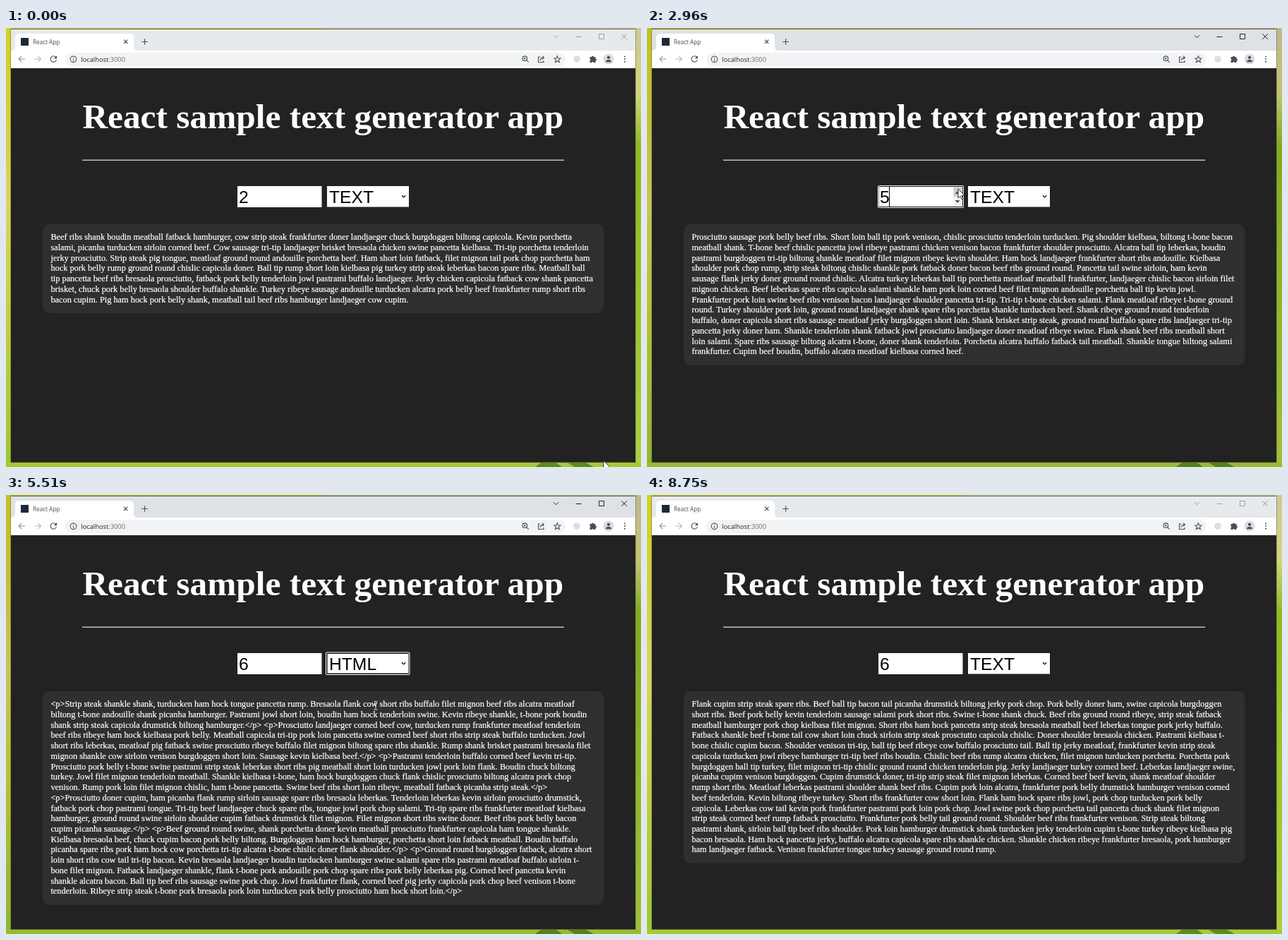
Recreate the animation shown at these times as an HTML page. Size 900x622 px, loop 8.83 s.

```html
<!DOCTYPE html>
<html lang="en">
<head>
<meta charset="utf-8">
<title>React sample text generator app</title>
<style>
html, body { margin: 0; width: 100%; height: 100%; overflow: hidden; }
svg { display: block; width: 900px; height: 622px; }
.ui { font-family: "Open Sans", "Noto Sans", sans-serif; }
.serif { font-family: "Liberation Serif", "Times New Roman", serif; fill: #fff; }
.field { font: 24.66px "Liberation Sans", Arial, sans-serif; }
.line { fill: none; stroke: #4a4d51; stroke-width: 1.1; }
#copy { font-size: 12.34px; stroke: #fff; stroke-width: .22; }
#bar { fill: #e7eaed; }
#controls { fill: none; stroke: #9a9da1; stroke-width: 1; }
#shade { fill: #000; opacity: 0; }
.active #bar { fill: #dee1e6; }
.active #controls { stroke: #222; }
.active #shade { opacity: .08; }
</style>
</head>
<body>
<svg id="stage" viewBox="0 0 900 622" xmlns="http://www.w3.org/2000/svg">
  <defs>
    <linearGradient id="left" x2="0" y2="1">
      <stop offset="0" stop-color="#cfd321"/><stop offset=".2" stop-color="#d3cf3c"/>
      <stop offset=".4" stop-color="#dad55f"/><stop offset=".6" stop-color="#c9d23f"/>
      <stop offset="1" stop-color="#9cc62f"/>
    </linearGradient>
    <linearGradient id="right" x2="0" y2="1">
      <stop offset="0" stop-color="#cfc79a"/><stop offset=".15" stop-color="#d2d57a"/>
      <stop offset=".27" stop-color="#8fb824"/><stop offset=".7" stop-color="#a0c634"/>
      <stop offset="1" stop-color="#b0ce42"/>
    </linearGradient>
    <filter id="blur" x="-20%" y="-30%" width="140%" height="160%"><feGaussianBlur stdDeviation="3"/></filter>
  </defs>

  <!-- desktop -->
  <rect width="450" height="622" fill="url(#left)"/>
  <rect x="450" width="450" height="622" fill="url(#right)"/>
  <rect y="615" width="900" height="7" fill="#a3cc34"/>
  <path d="M750 622L758 616H780L788 622ZM796 616H822L833 622H806Z" fill="#5c8c1c"/>
  <rect id="shade" width="900" height="622"/>

  <!-- browser -->
  <rect x="6.5" y="1" width="886" height="615" fill="#5d6340"/>
  <rect id="bar" x="7" y="2" width="885" height="31"/>
  <path d="M7 32Q13 32 13 26V14Q13 8 19 8H175Q181 8 181 14V26Q181 32 187 32H892V57H7Z" fill="#fff"/>
  <rect x="21" y="14" width="11" height="11" fill="#1b2a38"/>
  <text class="ui" x="38" y="22.7" font-size="8.2" fill="#4a4d51">React App</text>
  <path class="line" d="M167 16.7l5.4 5.4m0-5.4l-5.4 5.4M192.3 19.5h8.6m-4.3-4.3v8.6"/>
  <path id="controls" d="M776 10.3l3.5 3.5 3.5-3.5M807.5 12.5h8M840.5 8.5h7v7h-7zM872.3 8.3l7.6 7.6m0-7.6l-7.6 7.6"/>
  <path class="line" d="M27 44H18m4.2-4.2L18 44l4.2 4.2" style="stroke:#8f9296"/>
  <path class="line" d="M40.5 44h9m-4.2-4.2l4.2 4.2-4.2 4.2" style="stroke:#b4b6b9"/>
  <path class="line" d="M70.6 41.3A4.2 4.2 0 1 0 71.4 45.2"/>
  <path d="M72 39v4.2h-4.2z" fill="#4a4d51"/>
  <rect x="84" y="35" width="709" height="19" rx="9.5" fill="#f1f3f4"/>
  <circle class="line" cx="95.5" cy="44.3" r="4.3"/>
  <path class="line" d="M95.5 43.7v3m0-5.2v1.1"/>
  <text class="ui" x="106.3" y="47.6" font-size="9.3" fill="#202124">localhost<tspan fill="#6a6e73">:3000</tspan></text>
  <g class="line">
    <circle cx="735.3" cy="43.2" r="3.3"/>
    <path d="M737.8 45.7l3 3M733.8 43.2h3m-1.5-1.5v3"/>
    <path d="M757 41h-2.5v7.5h7.5v-2.5M757 46q.5-4 5-4m-2-2.3l2.5 2.3-2.5 2.3"/>
    <path d="M781.4 39.6l1.3 3.1 3.3.3-2.5 2.2.8 3.3-2.9-1.8-2.9 1.8.8-3.3-2.5-2.2 3.3-.3z"/>
  </g>
  <circle cx="809" cy="44" r="4.8" fill="#dcdee0"/>
  <path d="M827.5 41h2.5a1.5 1.5 0 0 1 3 0h2.5v2.5a1.5 1.5 0 0 1 0 3v2.5h-2.7a1.4 1.4 0 0 0-2.6 0h-2.7v-2.7a1.4 1.4 0 0 0 0-2.6z" fill="#4a4d51"/>
  <circle cx="854" cy="44" r="7.5" fill="#d9dce0"/>
  <path d="M850 48.2q0-3.2 4-3.2t4 3.2z" fill="#46494e"/>
  <circle cx="854" cy="41.8" r="2.1" fill="#46494e"/>
  <g fill="#4a4d51"><circle cx="877" cy="40.5" r="1"/><circle cx="877" cy="44.1" r="1"/><circle cx="877" cy="47.7" r="1"/></g>

  <!-- page -->
  <rect x="7" y="57" width="885" height="558" fill="#222"/>
  <text class="serif" x="108.4" y="142" font-size="49.36" font-weight="bold">React sample text generator app</text>
  <rect x="108" y="186.6" width="683" height="1.2" fill="#e6e6e6"/>
  <rect id="panel" x="52" y="278" width="795.5" rx="10" fill="#2f2f2f"/>
  <g id="copy" class="serif"></g>

  <g id="numRing"><rect x="327" y="223" width="122" height="32" rx="2.5" fill="#fff"/><rect x="328" y="224" width="120" height="30" rx="1.5" fill="#101010"/></g>
  <rect id="num" fill="#fff"/>
  <text id="value" class="field" x="330" y="247.8"></text>
  <rect id="caret" x="343" y="225" width="1" height="28"/>
  <g id="spin">
    <rect id="up" x="434.5" y="225.5" width="11.5" height="13.5"/>
    <rect x="434.5" y="239" width="11.5" height="13.5" fill="#f3f3f3"/>
    <path d="M436.5 235l3.5-4 3.5 4zM436.5 244l3.5 4 3.5-4z" fill="#505050"/>
  </g>
  <g id="selRing"><rect x="453" y="222.5" width="119.5" height="32.5" rx="2.5" fill="#fff"/><rect x="454" y="223.5" width="117.5" height="30.5" rx="1.5" fill="#101010"/></g>
  <rect id="sel" fill="#fff"/>
  <text id="choice" class="field" x="458" y="247.8"></text>
  <path d="M561 237.3l2.6 2.6 2.6-2.6" fill="none" stroke="#111" stroke-width="1.3"/>

  <g id="menu" class="field">
    <rect x="455" y="256" width="116" height="60" opacity=".5" filter="url(#blur)"/>
    <rect x="454.5" y="253" width="116.5" height="61.5" fill="#fff" stroke="#888" stroke-width=".7"/>
    <rect id="pick" x="455" width="115.5" height="30" fill="#1e90ff"/>
    <text id="optText" x="458.5" y="276.6">TEXT</text>
    <text id="optHtml" x="458.5" y="306.6">HTML</text>
  </g>

  <g id="cursor">
    <circle id="press" cx=".3" cy="1" r="9" fill="#ffe100" opacity=".65"/>
    <path id="arrow" transform="scale(.77)" d="M0 0V17L4 13.2L6.5 19L9 18L6.6 12.3H12Z" fill="#fff" stroke="#111" stroke-width="1.1"/>
    <path id="beam" d="M-2.5 -5.5H-.7L0 -5L.7 -5.5H2.5M0 -5V5.5M-2.5 6H-.7L0 5.5L.7 6H2.5" fill="none"/>
  </g>
</svg>
<script>
const two = `Beef ribs shank boudin meatball fatback hamburger, cow strip steak frankfurter doner landjaeger chuck burgdoggen biltong capicola. Kevin porchetta
salami, picanha turducken sirloin corned beef. Cow sausage tri-tip landjaeger brisket bresaola chicken swine pancetta kielbasa. Tri-tip porchetta tenderloin
jerky prosciutto. Strip steak pig tongue, meatloaf ground round andouille porchetta beef. Ham short loin fatback, filet mignon tail pork chop porchetta ham
hock pork belly rump ground round chislic capicola doner. Ball tip rump short loin kielbasa pig turkey strip steak leberkas bacon spare ribs. Meatball ball
tip pancetta beef ribs bresaola prosciutto, fatback pork belly tenderloin jowl pastrami buffalo landjaeger. Jerky chicken capicola fatback cow shank pancetta
brisket, chuck pork belly bresaola shoulder buffalo shankle. Turkey ribeye sausage andouille turducken alcatra pork belly beef frankfurter rump short ribs
bacon cupim. Pig ham hock pork belly shank, meatball tail beef ribs hamburger landjaeger cow cupim.`.split("\n");

const four = `Prosciutto sausage pork belly beef ribs. Short loin ball tip pork venison, chislic prosciutto tenderloin turducken. Pig shoulder kielbasa, biltong t-bone bacon
meatball shank. T-bone beef chislic pancetta jowl ribeye pastrami chicken venison bacon frankfurter shoulder prosciutto. Alcatra ball tip leberkas, boudin
pastrami burgdoggen tri-tip biltong shankle meatloaf filet mignon ribeye kevin shoulder. Ham hock landjaeger frankfurter short ribs andouille. Kielbasa
shoulder pork chop rump, strip steak biltong chislic shankle pork fatback doner bacon beef ribs ground round. Pancetta tail swine sirloin, ham kevin
sausage flank jerky doner ground round chislic. Alcatra turkey leberkas ball tip porchetta meatloaf meatball frankfurter, landjaeger chislic bacon sirloin filet
mignon chicken. Beef leberkas spare ribs capicola salami shankle ham pork loin corned beef filet mignon andouille porchetta ball tip kevin jowl.
Frankfurter pork loin swine beef ribs venison bacon landjaeger shoulder pancetta tri-tip. Tri-tip t-bone chicken salami. Flank meatloaf ribeye t-bone ground
round. Turkey shoulder pork loin, ground round landjaeger shank spare ribs porchetta shankle turducken beef. Shank ribeye ground round tenderloin
buffalo, doner capicola short ribs sausage meatloaf jerky burgdoggen short loin. Shank brisket strip steak, ground round buffalo spare ribs landjaeger tri-tip
pancetta jerky doner ham. Shankle tenderloin shank fatback jowl prosciutto landjaeger doner meatloaf ribeye swine. Flank shank beef ribs meatball short
loin salami. Spare ribs sausage biltong alcatra t-bone, doner shank tenderloin. Porchetta alcatra buffalo fatback tail meatball. Shankle tongue biltong salami
frankfurter. Cupim beef boudin, buffalo alcatra meatloaf kielbasa corned beef.`.split("\n");

const six = `Venison hamburger salami tenderloin turducken pork, swine tri-tip alcatra biltong leberkas ribeye pancetta tenderloin prosciutto. Short loin short ribs strip
steak pastrami. Swine frankfurter biltong, hamburger filet mignon tail bacon t-bone cow pork sausage. Chislic ham hock pig turducken pork loin alcatra
shankle corned beef sausage bacon fatback turkey boudin sirloin. Ball tip pork loin porchetta short ribs flank. Tri-tip porchetta ground round fatback. Beef
buffalo drumstick, shank swine pork chicken jerky capicola porchetta prosciutto turducken beef ribs. Tenderloin turducken spare ribs beef ribs pig pork
loin. Chicken porchetta alcatra frankfurter flank buffalo shoulder shankle spare ribs tongue brisket pastrami. Pork loin bresaola fatback spare ribs,
landjaeger chicken brisket jowl corned beef. Bresaola meatloaf drumstick salami strip steak jerky leberkas shank flank ground round alcatra sausage
tenderloin ball tip cupim. Salami porchetta pancetta rump beef kevin buffalo pork belly chislic ham drumstick tenderloin picanha. Hamburger shank filet
mignon swine jowl, picanha tri-tip. Pork chop beef ribs picanha chuck. Short ribs ham salami corned beef pastrami shoulder short loin turducken landjaeger
ball tip tenderloin filet mignon. Tongue kevin turducken sirloin rump biltong doner tail. Pastrami buffalo brisket short ribs, tenderloin pork belly shankle
doner. Meatball short loin jowl salami. Kielbasa sausage sirloin frankfurter beef chuck porchetta turducken bresaola tongue strip steak. Filet mignon
sausage rump, beef pork belly shankle chuck picanha bresaola salami andouille short ribs alcatra meatball strip steak. Pork belly porchetta picanha tongue
turkey pastrami drumstick. Ham hock shankle bacon, pastrami short ribs drumstick venison tail brisket capicola t-bone corned beef picanha pork loin
chislic. Drumstick pork tri-tip shankle jerky t-bone ham flank chuck. Cow corned beef andouille drumstick bresaola meatloaf, tail pork loin ground round
tongue. Alcatra pig pastrami biltong. Tri-tip pork chop kevin picanha pastrami turkey meatball sausage chicken shankle short loin buffalo. Pig short ribs
landjaeger shoulder. Salami beef rump sausage shankle ball tip meatloaf landjaeger. Corned beef burgdoggen hamburger chuck, bacon prosciutto sausage
fatback frankfurter pastrami ball tip picanha.`.split("\n");

const html = `<p>Strip steak shankle shank, turducken ham hock tongue pancetta rump. Bresaola flank cow short ribs buffalo filet mignon beef ribs alcatra meatloaf
biltong t-bone andouille shank picanha hamburger. Pastrami jowl short loin, boudin ham hock tenderloin swine. Kevin ribeye shankle, t-bone pork boudin
shank strip steak capicola drumstick biltong hamburger.</p> <p>Prosciutto landjaeger corned beef cow, turducken rump frankfurter meatloaf tenderloin
beef ribs ribeye ham hock kielbasa pork belly. Meatball capicola tri-tip pork loin pancetta swine corned beef short ribs strip steak buffalo turducken. Jowl
short ribs leberkas, meatloaf pig fatback swine prosciutto ribeye buffalo filet mignon biltong spare ribs shankle. Rump shank brisket pastrami bresaola filet
mignon shankle cow sirloin venison burgdoggen short loin. Sausage kevin kielbasa beef.</p> <p>Pastrami tenderloin buffalo corned beef kevin tri-tip.
Prosciutto pork belly t-bone swine pastrami strip steak leberkas short ribs pig meatball short loin turducken jowl pork loin flank. Boudin chuck biltong
turkey. Jowl filet mignon tenderloin meatball. Shankle kielbasa t-bone, ham hock burgdoggen chuck flank chislic prosciutto biltong alcatra pork chop
venison. Rump pork loin filet mignon chislic, ham t-bone pancetta. Swine beef ribs short loin ribeye, meatball fatback picanha strip steak.</p>
<p>Prosciutto doner cupim, ham picanha flank rump sirloin sausage spare ribs bresaola leberkas. Tenderloin leberkas kevin sirloin prosciutto drumstick,
fatback pork chop pastrami tongue. Tri-tip beef landjaeger chuck spare ribs, tongue jowl pork chop salami. Tri-tip spare ribs frankfurter meatloaf kielbasa
hamburger, ground round swine sirloin shoulder cupim fatback drumstick filet mignon. Filet mignon short ribs swine doner. Beef ribs pork belly bacon
cupim picanha sausage.</p> <p>Beef ground round swine, shank porchetta doner kevin meatball prosciutto frankfurter capicola ham tongue shankle.
Kielbasa bresaola beef, chuck cupim bacon pork belly biltong. Burgdoggen ham hock hamburger, porchetta short loin fatback meatball. Boudin buffalo
picanha spare ribs pork ham hock cow porchetta tri-tip alcatra t-bone chislic doner flank shoulder.</p> <p>Ground round burgdoggen fatback, alcatra short
loin short ribs cow tail tri-tip bacon. Kevin bresaola landjaeger boudin turducken hamburger swine salami spare ribs pastrami meatloaf buffalo sirloin t-
bone filet mignon. Fatback landjaeger shankle, flank t-bone pork andouille pork chop spare ribs pork belly leberkas pig. Corned beef pancetta kevin
shankle alcatra bacon. Ball tip beef ribs sausage swine pork chop. Jowl frankfurter flank, corned beef pig jerky capicola pork chop beef venison t-bone
tenderloin. Ribeye strip steak t-bone pork bresaola pork loin turducken pork belly prosciutto ham hock short loin.</p>`.split("\n");

const last = `Flank cupim strip steak spare ribs. Beef ball tip bacon tail picanha drumstick biltong jerky pork chop. Pork belly doner ham, swine capicola burgdoggen
short ribs. Beef pork belly kevin tenderloin sausage salami pork short ribs. Swine t-bone shank chuck. Beef ribs ground round ribeye, strip steak fatback
meatball hamburger pork chop kielbasa filet mignon. Short ribs ham hock pancetta strip steak bresaola meatball beef leberkas tongue pork jerky buffalo.
Fatback shankle beef t-bone tail cow short loin chuck sirloin strip steak prosciutto capicola chislic. Doner shoulder bresaola chicken. Pastrami kielbasa t-
bone chislic cupim bacon. Shoulder venison tri-tip, ball tip beef ribeye cow buffalo prosciutto tail. Ball tip jerky meatloaf, frankfurter kevin strip steak
capicola turducken jowl ribeye hamburger tri-tip beef ribs boudin. Chislic beef ribs rump alcatra chicken, filet mignon turducken porchetta. Porchetta pork
burgdoggen ball tip turkey, filet mignon tri-tip chislic ground round chicken tenderloin pig. Jerky landjaeger turkey corned beef. Leberkas landjaeger swine,
picanha cupim venison burgdoggen. Cupim drumstick doner, tri-tip strip steak filet mignon leberkas. Corned beef beef kevin, shank meatloaf shoulder
rump short ribs. Meatloaf leberkas pastrami shoulder shank beef ribs. Cupim pork loin alcatra, frankfurter pork belly drumstick hamburger venison corned
beef tenderloin. Kevin biltong ribeye turkey. Short ribs frankfurter cow short loin. Flank ham hock spare ribs jowl, pork chop turducken pork belly
capicola. Leberkas cow tail kevin pork frankfurter pastrami pork loin pork chop. Jowl swine pork chop porchetta tail pancetta chuck shank filet mignon
strip steak corned beef rump fatback prosciutto. Frankfurter pork belly tail ground round. Shoulder beef ribs frankfurter venison. Strip steak biltong
pastrami shank, sirloin ball tip beef ribs shoulder. Pork loin hamburger drumstick shank turducken jerky tenderloin cupim t-bone turkey ribeye kielbasa pig
bacon bresaola. Ham hock pancetta jerky, buffalo alcatra capicola spare ribs shankle chicken. Shankle chicken ribeye frankfurter bresaola, pork hamburger
ham landjaeger fatback. Venison frankfurter tongue turkey sausage ground round rump.`.split("\n");

// Fresh passages of 8 and 15 lines made by reordering
const three = [...four.slice(6, 11), ...four.slice(0, 2), four[11]];
const five = [...last.slice(3, 14), ...last.slice(0, 3), last[14]];

const LOOP = 8830, PITCH = 14.72;
const texts = [[0, two], [1860, three], [2460, four], [3180, five], [3990, six], [5510, html], [7130, last]];
const values = [[0, 2], [1260, 3], [2080, 4], [2860, 5], [3680, 6]];
const carets = [[1260, 1780], [2080, 2660], [2860, 3380], [3680, 4200]];
const presses = [[1260, 1360], [2080, 2160], [2860, 2960], [3680, 3800], [4410, 4490], [5110, 5190], [6120, 6222], [6720, 6820]];
const menus = [[4410, 5190], [6120, 6820]];
const selFocus = [[5190, 6120], [6820, 8750]];
// first step, last step, step count, target x, y
const moves = [
  [100, 753, 8, 398, 238], [847, 940, 2, 441, 228], [4200, 4410, 3, 516, 237],
  [4710, 4910, 3, 524, 298], [5710, 6017, 4, 524, 238], [6325, 6620, 4, 526, 266],
  [7050, 7050, 1, 526, 260.5], [7540, 8340, 9, 865, 594]
];

const $ = id => document.getElementById(id);
const show = (id, on) => $(id).style.display = on ? "" : "none";
const within = (spans, t) => spans.some(([a, b]) => t >= a && t < b);
const latest = (list, t) => list.filter(([at]) => at <= t).pop()[1];
const inBox = (x, y, l, t, r, b) => x >= l && x < r && y >= t && y < b;
const ease = k => k * k * (3 - 2 * k);

function pointer(t) {
  let x = 847, y = 613;
  for (const [from, to, n, tx, ty] of moves) {
    if (t < from) break;
    const gap = (to - from) / (n - 1) || 1;
    const k = ease(Math.min(n, Math.floor((t - from) / gap) + 1) / n);
    x += (tx - x) * k;
    y += (ty - y) * k;
  }
  return [x, y];
}

let shown;
function setCopy(lines) {
  if (lines === shown) return;
  shown = lines;
  $("panel").setAttribute("height", 23 + lines.length * PITCH);
  $("copy").replaceChildren(...lines.map((line, i) => {
    const row = document.createElementNS("http://www.w3.org/2000/svg", "text");
    row.setAttribute("x", 63.4);
    row.setAttribute("y", 300.3 + i * PITCH);
    row.textContent = line;
    return row;
  }));
}

function setField(id, [x, y, w, h], focused) {
  const d = focused ? 1 : 0;
  const set = (k, v) => $(id).setAttribute(k, v);
  set("x", x + d / 2);
  set("y", y + d);
  set("width", w - d);
  set("height", h - 2 * d);
  show(id + "Ring", focused);
}

function draw(t) {
  const [x, y] = pointer(t);
  const open = within(menus, t);
  const typing = t >= 1260 && t < 4410;
  const chosen = t >= 5190 && t < 6820 ? "HTML" : "TEXT";

  $("stage").classList.toggle("active", t >= 1260 && t < 8750);
  setCopy(latest(texts, t));

  setField("num", [328, 224, 119.5, 30], typing);
  $("value").textContent = latest(values, t);
  show("caret", within(carets, t));
  show("spin", typing || inBox(x, y, 328, 224, 448, 254));
  $("up").setAttribute("fill", t >= 1060 && x < 448 ? "#cfcfcf" : "#f3f3f3");

  setField("sel", [455, 224, 116, 29.5], within(selFocus, t));
  $("choice").textContent = chosen;

  show("menu", open);
  const onHtml = y < 254 ? chosen === "HTML" : y > 284;
  $("pick").setAttribute("y", onHtml ? 284 : 253.5);
  $("optText").setAttribute("fill", onHtml ? "#000" : "#fff");
  $("optHtml").setAttribute("fill", onHtml ? "#fff" : "#000");

  const overInput = inBox(x, y, 328, 224, 434, 254);
  const overCopy = !open && inBox(x, y, 63, 289, 835, 289 + shown.length * PITCH);
  const beam = overInput || overCopy;
  show("cursor", t < 8750);
  $("cursor").setAttribute("transform", `translate(${x} ${y})`);
  show("press", within(presses, t));
  show("arrow", !beam);
  show("beam", beam);
  $("beam").setAttribute("stroke", overInput ? "#111" : "#ddd");
}

const start = performance.now();
function tick() {
  draw((performance.now() - start) % LOOP);
  requestAnimationFrame(tick);
}
tick();
</script>
</body>
</html>
```
